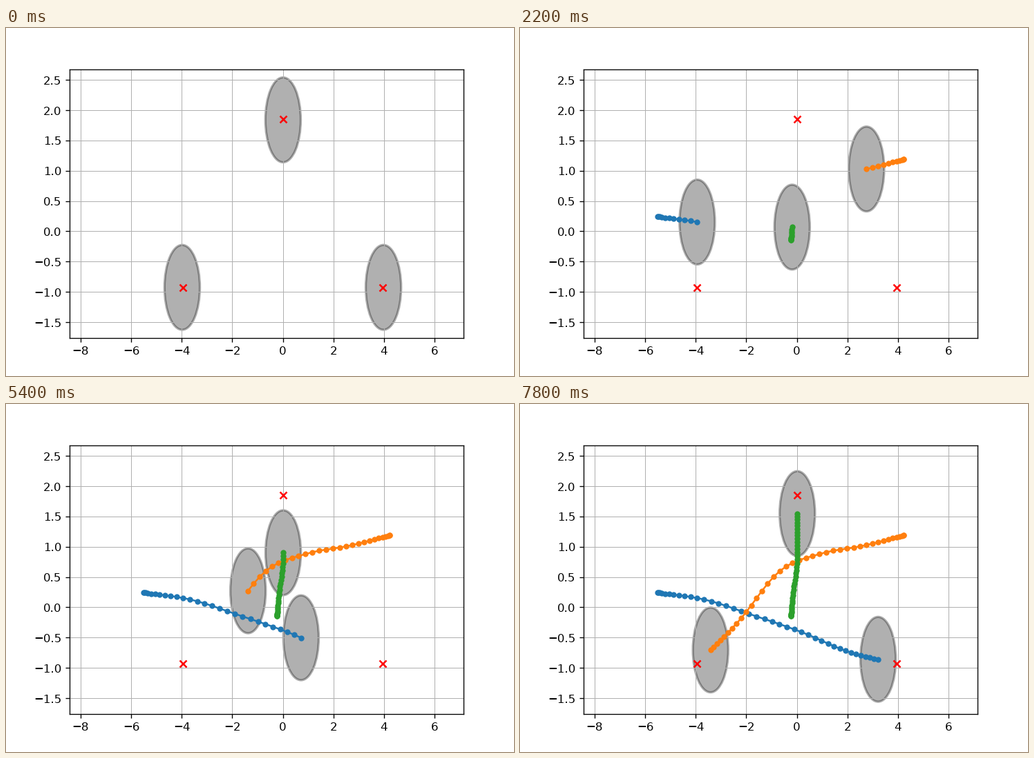
Write a matplotlib script that moves like this. It is 735 px wide and 504 px high and loops after 8 s.

```python
import numpy as np
import matplotlib.pyplot as plt
from matplotlib.animation import FuncAnimation
from matplotlib.patches import Circle

DPI = 120
STEPS = 40
RADIUS = 0.7
GOALS = [(3.95, -0.925), (-3.95, -0.925), (0.02, 1.85)]
REST = [(3.98, -0.925), (-3.98, -0.925), (0.01, 1.84)]

plt.rcParams["text.hinting"] = "no_autohint"


def spring(t, omega, zeta):
    """Progress from 0 towards 1 of a damped spring released at rest."""
    root = np.sqrt(1 - zeta ** 2)
    a = omega * root * t
    return 1 - np.exp(-zeta * omega * t) * (np.cos(a) + zeta / root * np.sin(a))


def curve(q, points):
    """Smooth curve through evenly spaced points, q from 0 to 1."""
    v = np.array(points)
    slope = np.gradient(v)
    pos = q * (len(v) - 1)
    i = np.clip(pos.astype(int), 0, len(v) - 2)
    u = pos - i
    return ((1 + 2 * u) * (1 - u) ** 2 * v[i] + u * (1 - u) ** 2 * slope[i]
            + u * u * (3 - 2 * u) * v[i + 1] + u * u * (u - 1) * slope[i + 1])


# Each agent is pulled along one axis while the other follows a bent path
t = np.arange(STEPS - 1)
q = spring(t, 0.067, 0.64)
blue = (curve(q, [-5.51, 3.95]), curve(q, [0.245, 0.125, -0.131, -0.405, -0.735, -0.925]))
q = spring(t, 0.071, 0.67)
orange = (curve(q, [4.235, -3.95]), curve(q, [1.19, 1.014, 0.887, 0.598, -0.234, -0.925]))
q = spring(t, 0.05, 0.44)
green = (curve(q, [-0.23, -0.14, -0.01, 0.02, 0.02, 0.02]), curve(q, [-0.142, 1.85]))
tracks = [blue, orange, green]

fig, ax = plt.subplots(figsize=(735 / DPI, 504 / DPI), dpi=DPI)
fig.subplots_adjust(left=0.125, right=0.9, bottom=0.11, top=0.88)
ax.set_xlim(-8.437, 7.135)
ax.set_ylim(-1.756, 2.667)
ax.set_xticks(range(-8, 7, 2))
ax.set_yticks(np.arange(-1.5, 2.6, 0.5))
ax.grid(True, lw=0.6)

bodies = [ax.add_patch(Circle(p, RADIUS, color="black", alpha=0.31, lw=2)) for p in REST]
trails = [ax.plot([], [], "o-", color=f"C{k}", ms=4, lw=1.5)[0] for k in range(3)]
ax.plot(*zip(*GOALS), "x", color="red", ms=6, mew=1.5)


def draw(n):
    for body, trail, rest, (x, y) in zip(bodies, trails, REST, tracks):
        trail.set_data(x[:n], y[:n])
        body.center = (x[n - 1], y[n - 1]) if n else rest
    return bodies + trails


anim = FuncAnimation(fig, draw, frames=STEPS, interval=200, repeat=True, repeat_delay=0)
plt.show()
```
